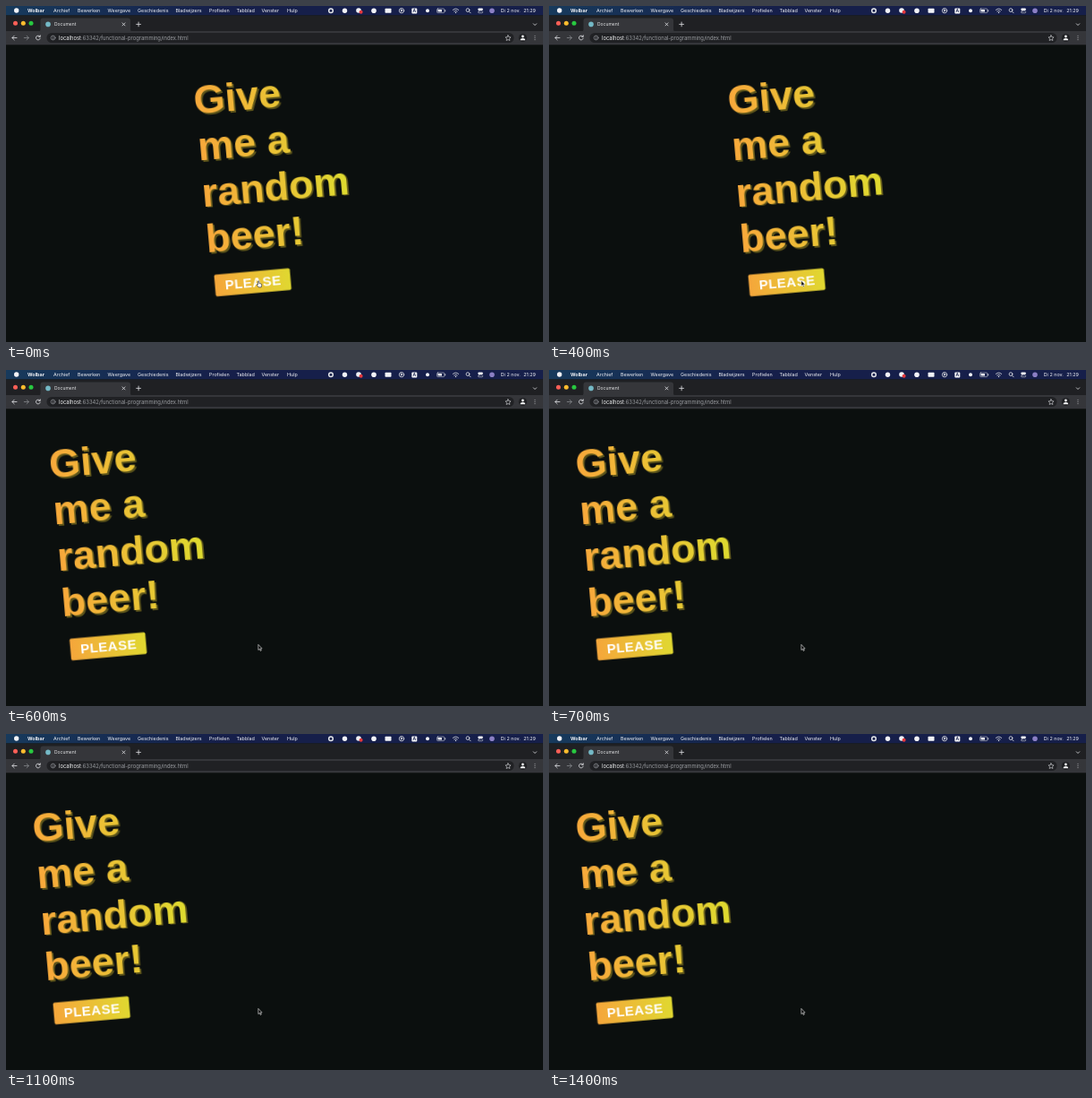
Write an HTML page that moves like this. It is 600 by 375 pixels and loops after 1500 ms.

```html
<!DOCTYPE html>
<html lang="nl">
<head>
<meta charset="utf-8">
<title>Document</title>
<style>
  html, body { margin: 0; width: 100%; height: 100%; overflow: hidden; background: #0b0f0e; }
  svg { display: block; width: 100%; height: 100%; }
  text { font-family: Inter, sans-serif; white-space: pre; }
  .menu text { font-size: 5.4px; fill: #f2f3f7; }
  .menu .app { font-weight: 700; }
  .url { font-size: 5.85px; fill: #9a9da1; }
  .url .host { fill: #f0f1f2; }
  .tab { font-size: 5px; fill: #e6e7e9; }
  .line { fill: none; stroke: #e2e4e8; stroke-width: .8; stroke-linecap: round; stroke-linejoin: round; }
  #words text { font: 700 45px "Liberation Sans", Arial, sans-serif; }
  .label { font: 700 15px "Liberation Sans", Arial, sans-serif; letter-spacing: .5px; fill: #fff; text-anchor: middle; }

  .card { animation: slide 1.5s step-end infinite; }
  .hand { animation: hand 1.5s step-end infinite; }
  .arrow { animation: arrow 1.5s step-end infinite; }
  @keyframes slide {
    0% { transform: translateX(0); }
    20% { transform: translateX(-2px); }
    26.6667% { transform: translateX(-10px); }
    33.3333% { transform: translateX(-42px); }
    40% { transform: translateX(-161.5px); }
    46.6667%, 100% { transform: translateX(-180px); }
  }
  @keyframes hand { 0% { opacity: 1; } 26.6667%, 100% { opacity: 0; } }
  @keyframes arrow { 0% { opacity: 0; } 26.6667%, 100% { opacity: 1; } }
</style>
</head>
<body>
<svg viewBox="0 0 600 375">
  <defs>
    <linearGradient id="gold" gradientUnits="userSpaceOnUse" x1="0" x2="165">
      <stop stop-color="#f8a83b"/><stop offset="1" stop-color="#dedb2f"/>
    </linearGradient>
    <linearGradient id="goldButton">
      <stop stop-color="#f5a63b"/><stop offset="1" stop-color="#e0d830"/>
    </linearGradient>
    <linearGradient id="bar">
      <stop stop-color="#173a5c"/><stop offset=".4" stop-color="#161f4a"/>
    </linearGradient>
    <g id="words">
      <text>Give</text>
      <text y="51.75">me a</text>
      <text y="103.5">random</text>
      <text y="155.25">beer!</text>
    </g>
  </defs>

  <rect width="600" height="375" fill="#0b0f0e"/>

  <g class="menu">
    <rect width="600" height="10.5" fill="url(#bar)"/>
    <circle cx="11.7" cy="5" r="2.7" fill="#f2f3f7"/>
    <text class="app" x="24" y="7">Wolbar</text>
    <text x="53" y="7">Archief</text>
    <text x="80" y="7">Bewerken</text>
    <text x="113.5" y="7">Weergave</text>
    <text x="147" y="7">Geschiedenis</text>
    <text x="189.5" y="7">Bladwijzers</text>
    <text x="227" y="7">Profielen</text>
    <text x="257.5" y="7">Tabblad</text>
    <text x="285.5" y="7">Venster</text>
    <text x="314" y="7">Hulp</text>
    <text x="552.7" y="7">Di 2 nov.</text>
    <text x="578.3" y="7">21:29</text>

    <g fill="#f2f3f7">
      <circle cx="378.5" cy="5.2" r="2.7"/>
      <circle cx="394" cy="5" r="2.8"/>
      <circle cx="411" cy="5.2" r="2.8"/>
      <rect x="423.5" y="2.8" width="7" height="5" rx=".7"/>
      <rect x="453.3" y="2.4" width="6" height="6" rx="1"/>
      <circle cx="471" cy="5.2" r="2"/>
      <rect x="482.5" y="4" width="4.5" height="2.6" rx=".4"/>
      <circle cx="502.5" cy="7.4" r=".7"/>
      <rect x="527.3" y="2.5" width="5.6" height="2.4" rx="1.2"/>
    </g>
    <circle cx="396.6" cy="6.8" r="2" fill="#e5383d"/>
    <text x="456.3" y="7.2" text-anchor="middle" style="fill:#17204a;font-size:5px;font-weight:600">A</text>
    <circle cx="543" cy="5.2" r="2.8" fill="#8b7fc4"/>
    <g class="line">
      <circle cx="363" cy="5.2" r="2.3" stroke-width="1.5"/>
      <circle cx="442" cy="5.2" r="2.7"/>
      <path d="M441.4 4.2v2l1.5-1z"/>
      <rect x="481.5" y="3" width="8.3" height="4.6" rx="1" stroke-width=".5"/>
      <path d="M490.7 4.6v1.4M499.3 4.4q3.2-2.8 6.4 0M500.8 5.9q1.7-1.4 3.4 0"/>
      <circle cx="516" cy="4.6" r="1.9"/>
      <path d="M517.5 6.1l1.6 1.7"/>
      <rect x="527.5" y="5.8" width="5.2" height="2" rx="1" stroke-width=".5"/>
    </g>
  </g>

  <rect y="10.5" width="600" height="18.5" fill="#1f2023"/>
  <rect y="28" width="600" height="15.3" fill="#35363a"/>
  <path d="M36 28.5q2.5 0 2.5-2.5V16.5q0-3 3-3H136q3 0 3 3V26q0 2.5 2.5 2.5z" fill="#35363a"/>
  <circle cx="10.5" cy="19.2" r="2.5" fill="#fe5f57"/>
  <circle cx="19.3" cy="19.2" r="2.5" fill="#febc2e"/>
  <circle cx="28" cy="19.2" r="2.5" fill="#28c840"/>
  <circle cx="47" cy="20.4" r="2.8" fill="#74b9c6"/>
  <text class="tab" x="54" y="22.4">Document</text>
  <rect x="45.5" y="30" width="522" height="11" rx="5.5" fill="#202124"/>
  <text class="url" x="59" y="37.5"><tspan class="host">localhost</tspan>:63342/functional-programming/index.html</text>

  <g class="line">
    <path d="M130 18.9l3 3m0-3l-3 3M145.7 20.4h4.8m-2.4-2.4v4.8M589.3 19.8l1.7 1.7 1.7-1.7"/>
    <path d="M12 35.5H7m2.2-2.3L6.9 35.5l2.3 2.3"/>
    <path d="M20.3 35.5h5m-2.2-2.3l2.3 2.3-2.3 2.3" stroke="#85878b"/>
    <path d="M37.8 34a2.4 2.4 0 1 0 .4 2.2M38.3 32.8v1.6h-1.6"/>
    <g stroke="#a8abb0" stroke-width=".6">
      <circle cx="52.6" cy="35.5" r="2.4"/>
      <path d="M52.6 35.3v1.5m0-2.8v.1"/>
    </g>
    <path d="M561 32.7l.9 1.9 2.1.3-1.5 1.5.4 2.1-1.9-1-1.9 1 .4-2.1-1.5-1.5 2.1-.3z" stroke-width=".6"/>
  </g>
  <circle cx="577.4" cy="35.5" r="4.6" fill="#202124"/>
  <circle cx="577.4" cy="34" r="1.4" fill="#f1f2f3"/>
  <path d="M574.6 38.2q0-2.2 2.8-2.2t2.8 2.2z" fill="#f1f2f3"/>
  <path class="line" d="M591 33.4v0m0 2.1v0m0 2.1v0" stroke-width="1.1"/>

  <g class="card">
    <g transform="translate(211 120.7) rotate(-5)">
      <use href="#words" x="1.8" y="1.8" fill="#5c541a"/>
      <use href="#words" fill="url(#gold)"/>
      <rect x="5.7" y="180.5" width="84.8" height="24.3" rx="1.8" fill="url(#goldButton)"/>
      <text class="label" x="48.4" y="197.8">PLEASE</text>
    </g>
  </g>

  <g stroke-linejoin="round">
    <path class="hand" d="M281.6 307.2q.7-.7 1.3 0v2.2l2.1.6q.8.3.7 1.2l-.5 2.7h-3l-2.2-2.9q.2-.9 1.6 0z" fill="#fff" stroke="#111" stroke-width=".6"/>
    <path class="arrow" d="M281.9 306.4v6.1l1.4-1.2 1 2.2 1-.5-1-2.1h1.8z" fill="#050505" stroke="#f4f4f4" stroke-width=".6"/>
  </g>
</svg>
</body>
</html>
```
